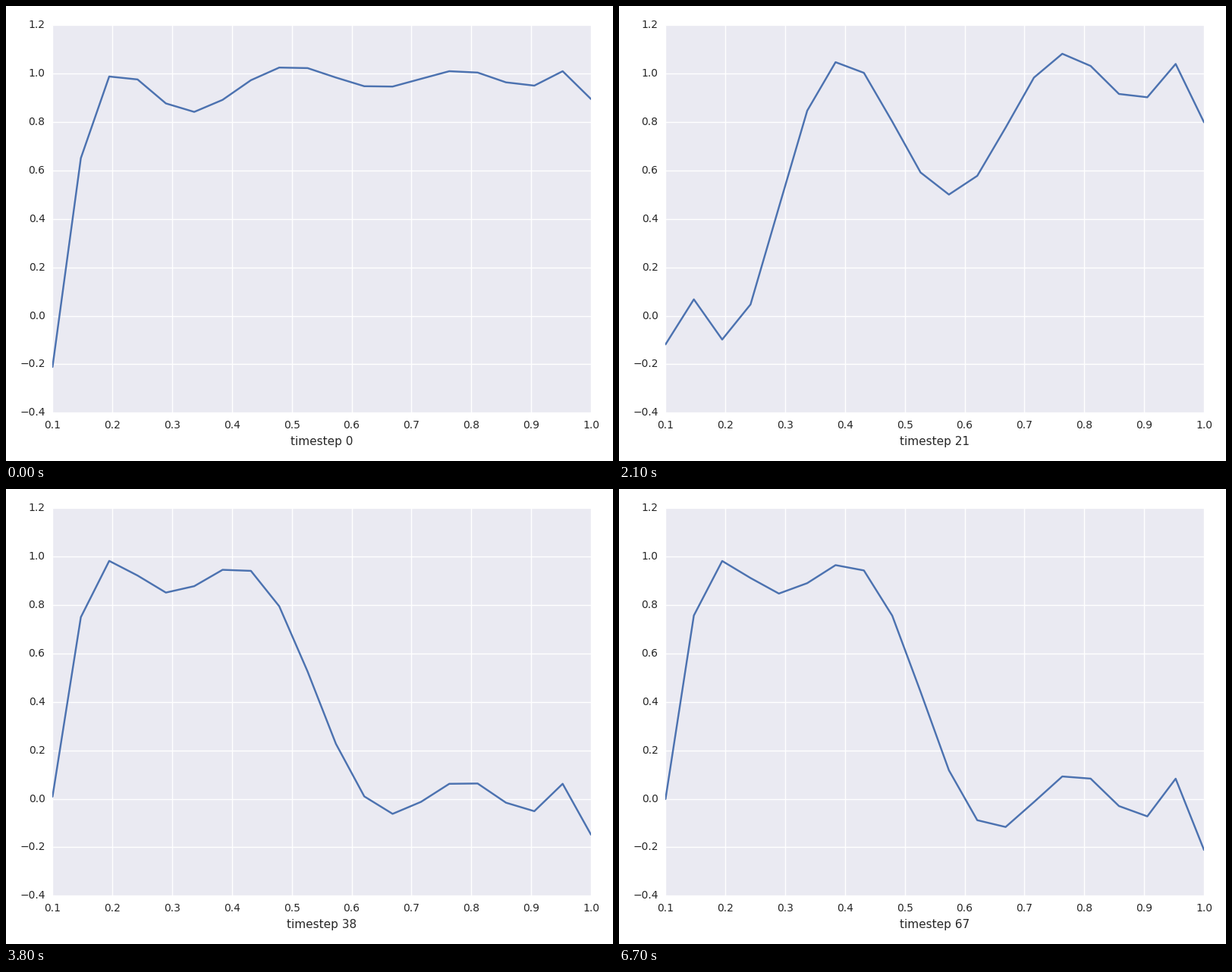
A matplotlib script for the animation above (6.8 s loop, 800 by 600 pixels).

```python
import numpy as np
import matplotlib.pyplot as plt
from matplotlib.animation import FuncAnimation
from numpy.polynomial import Polynomial
from numpy.polynomial.legendre import legvander

W, H, DPI = 800, 600, 100
STEPS = 68
DEGREE = 9
INK = "0.15"

plt.rcParams.update({
    "font.family": "DejaVu Sans",
    "font.size": 10,
    "lines.solid_capstyle": "round",
    "ytick.alignment": "center",
})

x = np.linspace(0.1, 1.0, 20)
u = np.linspace(-1, 1, 20)
knots = [0, 1, 3, 5, 8, 11, 14, 16, 18, 19]  # denser towards both ends


def fit(*values):
    """Polynomial through one value per knot, sampled on x."""
    return Polynomial.fit(u[knots], values, DEGREE)(u)


def band(centre, width):
    """Narrow band as seen by a least-squares fit of the same degree."""
    weights = (np.arange(DEGREE + 1) + 0.5) * legvander([centre], DEGREE)[0]
    return width * legvander(u, DEGREE) @ weights


rise = fit(-.211, .651, .976, .842, 1.025, .948, 1.01, .964, 1.01, .895)
bump = fit(.117, .221, -.021, .691, .107, -.006, -.001, .003, -.009, .096)
notch = fit(-.051, 1.013, .322, .611, 1.086, .934, 1.031, .961, 1.025, .906)
twin = fit(-.118, .068, .047, .847, .802, .578, 1.082, .916, 1.04, .799)
hump = fit(-.257, .611, .784, 1.034, .711, -.056, .06, -.013, .05, -.104)
shelf = fit(.009, .75, .922, .878, .795, .01, .062, -.016, .062, -.148)
final = shelf - band(0.06, 0.035)

poses = {0: rise, 6: bump, 14: notch, 21: twin, 30: hump,
         37: shelf, 56: shelf, 63: final}
times = list(poses)
shapes = np.array(list(poses.values()))


def curve(step):
    return [np.interp(step, times, column) for column in shapes.T]


fig = plt.figure(figsize=(W / DPI, H / DPI), dpi=DPI, facecolor="white")
left, right, top, bottom = 61.3, 771.0, 25.3, 536.3
ax = fig.add_axes([left / W, 1 - bottom / H,
                   (right - left) / W, (bottom - top) / H],
                  facecolor="#EAEAF2")
ax.set(xlim=(0.1, 1.0), ylim=(-0.4, 1.2),
       xticks=np.linspace(0.1, 1.0, 10), yticks=np.arange(-2, 7) / 5)
ax.xaxis.set_major_formatter("{x:.1f}")
ax.yaxis.set_major_formatter(lambda v, _: f"{v:.1f}".replace("-", "\u2212"))
ax.tick_params(length=0, pad=7, labelcolor=INK)
ax.set_axisbelow(True)
ax.grid(color="white", lw=1, ls="-")
ax.spines[:].set_visible(False)

line, = ax.plot(x, curve(0), color="#4C72B0", lw=1.75)
label = fig.text((left + right) / 2 / W, 1 - 579 / H, "", size=11,
                 color=INK, ha="center", va="baseline")


def update(step):
    line.set_ydata(curve(step))
    label.set_text(f"timestep {step}")
    return line, label


anim = FuncAnimation(fig, update, frames=STEPS, interval=100,
                     repeat=True, repeat_delay=0)
plt.show()
```
